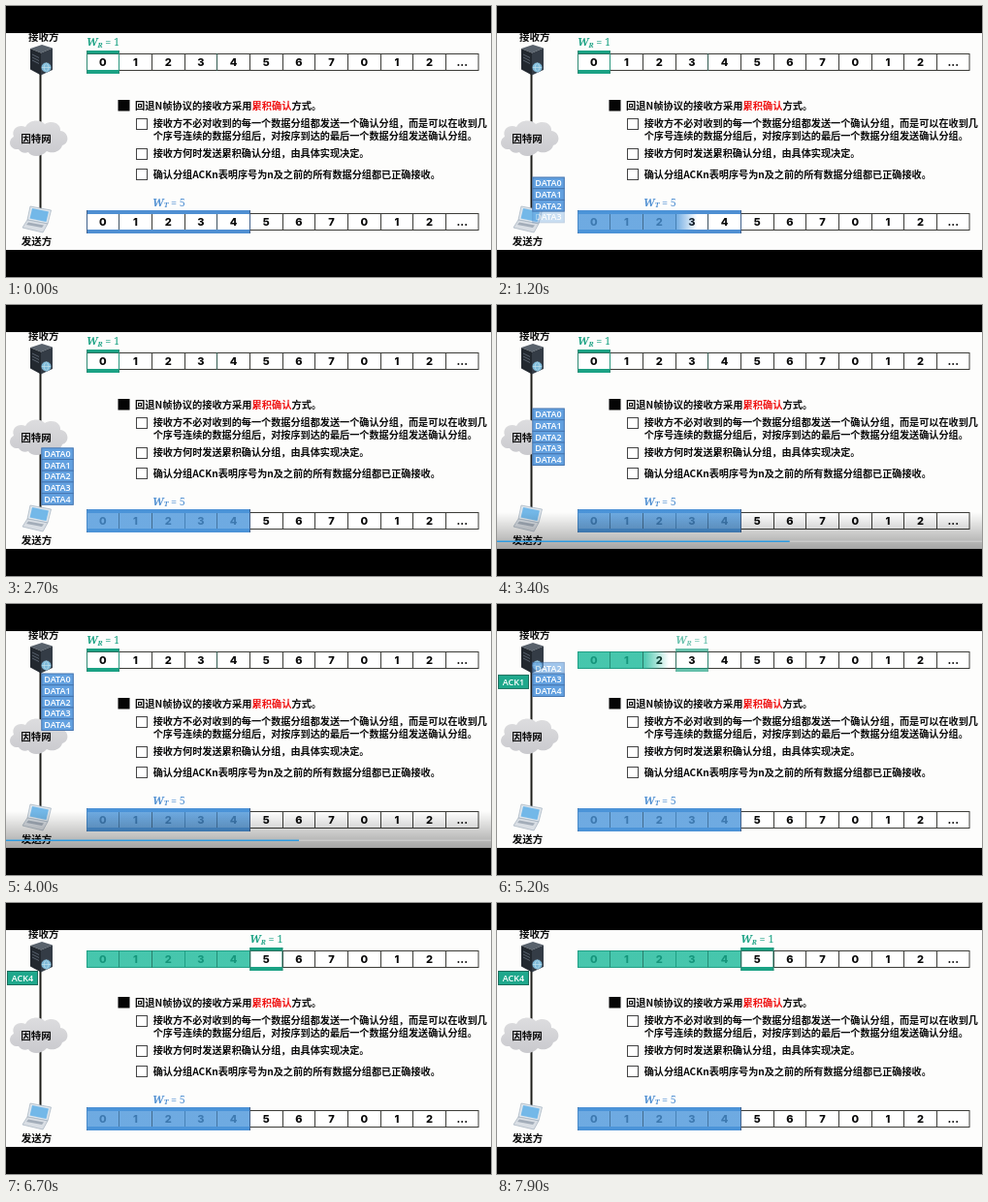
An HTML page for the animation above (8000 ms loop, 500x280 px).

```html
<!DOCTYPE html>
<html lang="zh-CN">
<head>
<meta charset="utf-8">
<title>累积确认</title>
<style>
  html, body { margin: 0; width: 100%; height: 100%; overflow: hidden; background: #000; }
  svg { display: block; width: 500px; height: 280px; }
  text { font-family: "Noto Sans CJK SC", "Noto Sans CJK", sans-serif; font-weight: 700; fill: #0a0a0a; }
  .mid { text-anchor: middle; }
  .digit { font: 800 11px Inter, "Liberation Sans", sans-serif; }
  .label { font-size: 10.5px; }
  .title { font-size: 10.25px; }
  .item { font-size: 10.15px; }
  .box { fill: #fff; stroke: #444; stroke-width: 1; }
  .math { font: italic 700 10.8px "Noto Serif", "Liberation Serif", serif; }
  .math .sub { font-size: 7px; }
  .math .up { font-style: normal; font-weight: 400; }
  .packet { font: 600 9px "Open Sans", "Noto Sans", sans-serif; fill: #fff; }
  .green { fill: #1ba284; }
  .blue { fill: #4f8fd2; }
</style>
</head>
<body>
<svg viewBox="0 0 500 280">
  <defs id="defs">
    <linearGradient id="shade" x2="0" y2="1">
      <stop offset="0" stop-opacity="0"/>
      <stop offset="1" stop-opacity=".35"/>
    </linearGradient>
    <linearGradient id="cloud" x2="0" y2="1">
      <stop offset="0" stop-color="#dddddf"/>
      <stop offset="1" stop-color="#c9c9cd"/>
    </linearGradient>
  </defs>
  <rect width="500" height="280" fill="#000"/>
  <rect y="28" width="500" height="224" fill="#fdfdfc"/>

  <!-- network path -->
  <path d="M35.500 66V212" stroke="#1c1c18" stroke-width="2"/>
  <g id="server">
    <path d="M25 44L37 40L48 43.500L36 48.500Z" fill="#59626c"/>
    <path d="M25 44L36 48.500V71.500L25 65.500Z" fill="#22282f"/>
    <path d="M36 48.500L48 43.500V66L36 71.500Z" fill="#343c46"/>
    <path d="M27 50L34 53.500M27 53L34 56.500M27 56L34 59.500" stroke="#59636f"/>
    <circle cx="41.500" cy="63.500" r="5" fill="#7db9d8"/>
    <path d="M37 63.500H46M41.500 59C38.500 61 38.500 66 41.500 68C44.500 66 44.500 61 41.500 59" fill="none" stroke="#c3e2ee" stroke-width=".7"/>
  </g>
  <path d="M13 148C4 149 1 139 8 135C5 127 13 122 20 125C24 117 36 117 40 122C48 117 57 122 56 129C65 130 66 142 58 144C56 151 47 153 42 150C36 157 26 156 23 151C19 153 15 151 13 148Z"
        fill="url(#cloud)"/>
  <g>
    <path d="M25 207L46.500 211L43 225L22 221Z" fill="#dfe7ee" stroke="#a3afbc" stroke-width=".7"/>
    <path d="M27 209L44 212.500L41.500 223L24.500 219.500Z" fill="#73b8e8"/>
    <path d="M22 221L43 225L38 234L17 229Z" fill="#d9dee4" stroke="#a3afbc" stroke-width=".7"/>
    <path d="M23 223.500L39 226.500L37 229L21 226Z" fill="#a3adb9"/>
  </g>
  <text class="label mid" x="38.700" y="36.300">接收方</text>
  <text class="label mid" x="31" y="141">因特网</text>
  <text class="label mid" x="31.500" y="246.800">发送方</text>

  <!-- explanation -->
  <rect x="115.500" y="97" width="12" height="11.500" fill="#050505"/>
  <text class="title" x="133" y="106.700">回退N帧协议的接收方采用<tspan fill="#f01414">累积确认</tspan>方式。</text>
  <rect class="box" x="134.500" y="116.500" width="11" height="11"/>
  <text class="item" x="151.700" y="124.900">接收方不必对收到的每一个数据分组都发送一个确认分组，而是可以在收到几</text>
  <text class="item" x="151.700" y="138">个序号连续的数据分组后，对按序到达的最后一个数据分组发送确认分组。</text>
  <rect class="box" x="134.500" y="147.500" width="11" height="11"/>
  <text class="item" x="151.700" y="156">接收方何时发送累积确认分组，由具体实现决定。</text>
  <rect class="box" x="134.500" y="168.500" width="11" height="11"/>
  <text class="item" x="151.700" y="177.700">确认分组ACKn表明序号为n及之前的所有数据分组都已正确接收。</text>

  <!-- sequence number tables -->
  <g id="tables"></g>
  <g id="recvWindow">
    <path class="green" d="M83 46H117V49.500H83ZM83 66H117V70H83Z"/>
    <path d="M83.500 46V70M116.500 46V70" stroke="#2f8a74"/>
    <text class="math green mid" x="100" y="41">W<tspan class="sub" dy="1.500">R</tspan><tspan class="up" dy="-1.500"> = 1</tspan></text>
  </g>
  <path class="blue" d="M83 211H252V215H83ZM83 231H252V235H83Z"/>
  <path d="M83.500 211V235M251.500 211V235" stroke="#41618c"/>
  <text class="math blue mid" x="168" y="206.500">W<tspan class="sub" dy="1.500">T</tspan><tspan class="up" dy="-1.500"> = 5</tspan></text>
  <g id="fills"></g>

  <!-- packets -->
  <g id="stack"></g>
  <g id="ack">
    <rect x="1.500" y=".5" width="31" height="14" fill="#1fa88c" stroke="#1b6e5c"/>
    <text class="packet mid" id="ackText" x="17" y="10.800"></text>
  </g>

  <!-- playback line -->
  <g id="bar">
    <rect y="214" width="500" height="38" fill="url(#shade)"/>
    <rect y="243.500" width="500" height="1.500" fill="#fff" opacity=".25"/>
    <rect id="played" y="243.500" height="1.500" fill="#2d9be0"/>
  </g>
</svg>
<script>
const LOOP = 8000, STEP = 100;
const LEFT = 83, CELL = 33.67, CELLS = 12, SENT = 5;
const ROW = 11.7;
const SPEED = 140 / 2400;
const TAKE_START = 4600, TAKE = 250;
const $ = id => document.getElementById(id);
const clamp = v => Math.max(0, Math.min(1, v));
const progress = (t, start, length) => clamp((t - start) / length);

function add(parent, tag, attrs, text) {
  const el = document.createElementNS("http://www.w3.org/2000/svg", tag);
  for (const key in attrs) el.setAttribute(key, attrs[key]);
  if (text !== undefined) el.textContent = text;
  parent.append(el);
  return el;
}

function drawTable(top, height) {
  const line = { stroke: "#3c3c38", "stroke-width": 1 };
  const right = LEFT + CELL * CELLS;
  add($("tables"), "rect", { x: LEFT + .5, y: top, width: right - LEFT - .5, height, fill: "#fff", ...line });
  for (let i = 0; i < CELLS; i++) {
    const x = LEFT + CELL * i;
    if (i) add($("tables"), "path", { d: `M${Math.floor(x) + .5} ${top}v${height}`, ...line });
    add($("tables"), "text", { class: "digit mid", x: x + CELL / 2, y: top + height / 2 + 4 },
      i === CELLS - 1 ? "..." : i % 8);
  }
}

// A cell cover with a soft edge that sweeps from left to right.
function makeFill(name, i, y, height, color) {
  const grad = add($("defs"), "linearGradient", { id: name + i });
  const stops = [1, 0].map(opacity =>
    add(grad, "stop", { offset: 0, "stop-color": color, "stop-opacity": opacity }));
  add($("fills"), "rect", { x: LEFT + CELL * i, y, width: CELL, height, fill: `url(#${name + i})`, opacity: .8 });
  return p => {
    stops[0].setAttribute("offset", clamp(2 * p - 1));
    stops[1].setAttribute("offset", clamp(2 * p));
  };
}

drawTable(49.5, 17);
drawTable(214.5, 17);

const packets = Array.from({ length: SENT }, (_, i) => {
  const node = add($("stack"), "g", {});
  add(node, "rect", { x: 36.8, y: ROW * i, width: 32.5, height: ROW, fill: "#63a1e0", stroke: "#4475b0" });
  add(node, "text", { class: "packet mid", x: 53, y: ROW * i + 9.1 }, "DATA" + i);
  return {
    node,
    send: makeFill("send", i, 211.5, 23, "#4a95da"),
    receive: makeFill("receive", i, 49, 18, "#18b898")
  };
});

function draw(t) {
  packets.forEach((packet, i) => {
    const sent = progress(t, 200 + 300 * i, 300);
    const received = progress(t, TAKE_START + TAKE * i, TAKE);
    packet.send(sent);
    packet.receive(received);
    packet.node.setAttribute("opacity", sent * (1 - received));
  });

  const rise = SPEED * 2400 * progress(t, 2200, 2400);
  $("stack").setAttribute("transform", `translate(0 ${177 - rise})`);

  // The window jumps one cell per packet and fades in at its new place.
  const base = Math.max(0, Math.min(SENT, Math.floor((t - TAKE_START) / TAKE) + 1));
  const arrived = TAKE_START + TAKE * (base - 1);
  $("recvWindow").setAttribute("transform", `translate(${CELL * base} 0)`);
  $("recvWindow").setAttribute("opacity", base ? progress(t, arrived - 50, 225) : 1);

  // The first acknowledgement fades in the cloud; the last one waits.
  const last = t >= 6200;
  const fall = last ? 0 : SPEED * Math.max(0, t - 5150);
  const shown = last ? 1 : t < 5100 ? 0 : 1 - progress(t, 5950, 250);
  $("ack").setAttribute("opacity", shown);
  $("ack").setAttribute("transform", `translate(0 ${70 + fall})`);
  $("ackText").textContent = last ? "ACK4" : "ACK1";

  $("bar").setAttribute("visibility", t >= 3300 && t < 4400 ? "visible" : "hidden");
  $("played").setAttribute("width", 302 + (t - 4000) / 2000);
}

function tick() {
  draw(Math.floor(performance.now() % LOOP / STEP) * STEP);
  requestAnimationFrame(tick);
}
tick();
</script>
</body>
</html>
```
